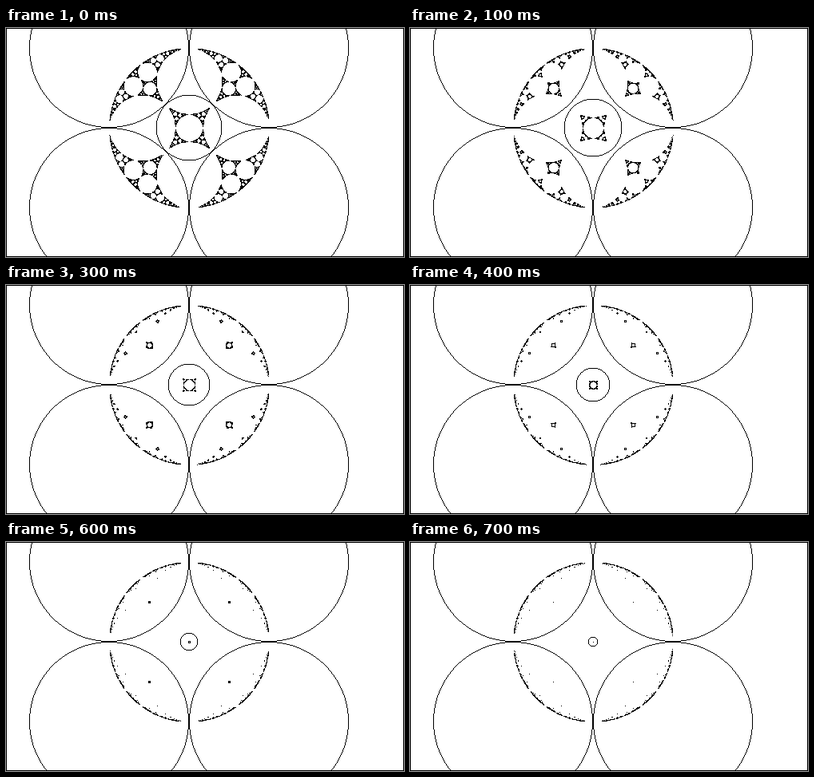
These frames come from a looping animation (498 by 287 pixels, 800 ms). An HTML page with a canvas:

```html
<!DOCTYPE html>
<html lang="en">
<head>
<meta charset="utf-8">
<title>Limit set of circle inversions</title>
<style>
html, body { margin: 0; width: 100%; height: 100%; overflow: hidden; background: #fff; }
canvas { display: block; }
</style>
</head>
<body>
<canvas id="stage" width="498" height="287"></canvas>
<script>
const W = 498, H = 287, STEPS = 8, STEP_MS = 100, POINTS = 600000;
const CX = 229, CY = 125, R = 100;
const BLACK = 0xff000000, WHITE = 0xffffffff;
const ctx = document.getElementById('stage').getContext('2d');

function randomizer(seed) {
  return () => {
    seed = (seed + 0x6d2b79f5) | 0;
    let t = Math.imul(seed ^ (seed >>> 15), 1 | seed);
    t = (t + Math.imul(t ^ (t >>> 7), 61 | t)) ^ t;
    return ((t ^ (t >>> 14)) >>> 0) / 4294967296;
  };
}

function render(step) {
  const image = ctx.createImageData(W, H);
  const pixels = new Uint32Array(image.data.buffer).fill(WHITE);
  const plot = (x, y) => {
    if (x >= 0 && x < W && y >= 0 && y < H) pixels[y * W + x] = BLACK;
  };

  // One-pixel outline, mirrored in all octants.
  function outline({ x, y, r }) {
    const edge = r - 0.5;
    for (let a = 0.5; a <= edge * Math.SQRT1_2 + 0.5; a++) {
      const b = Math.sqrt(edge * edge - a * a);
      for (const sx of [-1, 1]) for (const sy of [-1, 1]) {
        plot(Math.floor(x + sx * a), Math.floor(y + sy * b));
        plot(Math.floor(x + sx * b), Math.floor(y + sy * a));
      }
    }
  }

  const circles = [{ x: CX, y: CY, r: R * (Math.SQRT2 - 1) - 5 * step }];
  for (const sx of [-1, 1]) for (const sy of [-1, 1]) {
    circles.push({ x: CX + sx * R, y: CY + sy * R, r: R });
  }
  circles.forEach(outline);

  // Random chain of inversions, never the same circle twice in a row.
  const random = randomizer(step + 1);
  let x = CX + R, y = CY + 30, last = 0;
  for (let i = 0; i < POINTS; i++) {
    last = (last + 1 + Math.floor(random() * 4)) % 5;
    const c = circles[last], dx = x - c.x, dy = y - c.y;
    const k = c.r * c.r / (dx * dx + dy * dy);
    x = c.x + dx * k;
    y = c.y + dy * k;
    if (i > 20) plot(Math.round(x), Math.round(y));
  }

  for (let i = 0; i < W; i++) { plot(i, 0); plot(i, H - 1); }
  for (let i = 0; i < H; i++) { plot(0, i); plot(W - 1, i); }
  return image;
}

const frames = Array.from({ length: STEPS }, (_, step) => render(step));
const start = performance.now();

function draw() {
  const elapsed = Math.max(0, performance.now() - start);
  ctx.putImageData(frames[Math.floor(elapsed / STEP_MS) % STEPS], 0, 0);
  requestAnimationFrame(draw);
}
draw();
</script>
</body>
</html>
```
